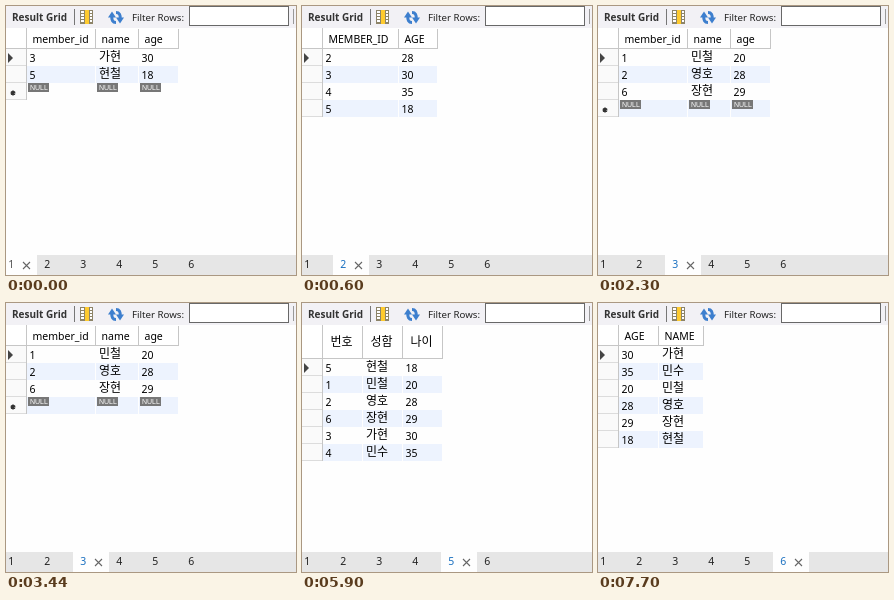
These frames come from a looping animation (290 px wide and 269 px high, 8 s). An HTML page:

```html
<!DOCTYPE html>
<html lang="ko">
<head>
<meta charset="utf-8">
<title>Result grid tabs</title>
<style>
  html, body { margin: 0; width: 100%; height: 100%; overflow: hidden; background: #fefefe; }
  svg { display: block; width: 290px; height: 269px; }
  rect { shape-rendering: crispEdges; }
  text { font: 10.5px "Noto Sans", "Noto Sans CJK KR", "Noto Sans CJK", sans-serif; fill: #000; white-space: pre; }
  text.ko { font: 12px "Noto Sans CJK KR", "Noto Sans CJK", sans-serif; }
  text.null { font: 7px "Liberation Sans", sans-serif; fill: #fff; }
  text.title { font-size: 10px; font-weight: 700; fill: #333; }
  text.label { font-size: 9.7px; fill: #222; }
</style>
</head>
<body>
<svg id="stage" viewBox="0 0 290 269"></svg>
<script>
const NS = 'http://www.w3.org/2000/svg';
const stage = document.getElementById('stage');

function add(parent, tag, attrs = {}, content) {
  const el = document.createElementNS(NS, tag);
  for (const key in attrs) el.setAttribute(key, attrs[key]);
  if (content !== undefined) el.textContent = content;
  parent.appendChild(el);
  return el;
}
const box = (p, x, y, width, height, fill) => add(p, 'rect', { x, y, width, height, fill });
const path = (p, d, attrs) => add(p, 'path', { d, fill: 'none', ...attrs });
const label = (p, x, y, str, cls = '') => add(p, 'text', { x, y, class: cls }, str);
const isHangul = str => /[가-힣]/.test(str);

const LINE = '#c6c6c6', STRIPE = '#edf3fe', ROW = 17;

// edges: left side of each column, then the right side of the last one
const tables = [
  { edges: [21, 90, 133, 173], heads: ['member_id', 'name', 'age'],
    rows: ['3 가현 30', '5 현철 18'], blank: true },
  { edges: [21, 97, 136], heads: ['MEMBER_ID', 'AGE'],
    rows: ['2 28', '3 30', '4 35', '5 18'] },
  { edges: [21, 90, 133, 173], heads: ['member_id', 'name', 'age'],
    rows: ['1 민철 20', '2 영호 28', '6 장현 29'], blank: true },
  { edges: [21, 66], heads: ['NAME'], rows: ['민수', '장현'] },
  { edges: [21, 61, 101, 141], heads: ['번호', '성함', '나이'], top: 56,
    rows: ['5 현철 18', '1 민철 20', '2 영호 28', '6 장현 29', '3 가현 30', '4 민수 35'] },
  { edges: [21, 61, 106], heads: ['AGE', 'NAME'],
    rows: ['30 가현', '35 민수', '20 민철', '28 영호', '29 장현', '18 현철'] }
];

// start time in ms, table shown, active tab
const steps = [
  [0, 0, 0], [500, 0, 1], [600, 1, 1], [2300, 2, 2],
  [4200, 3, 3], [5900, 4, 4], [7700, 5, 5]
];
const LOOP = 8000;

function drawToolbar() {
  box(stage, 0, 0, 290, 22, '#f2f1f5');
  label(stage, 6, 15, 'Result Grid', 'title');
  box(stage, 68, 3, 1, 16, '#777');

  box(stage, 74, 4, 13, 14, '#8d8468');
  box(stage, 79, 4, 4, 14, '#ffcb2e');
  for (let y = 5; y < 17; y += 3) {
    box(stage, 75, y, 3, 2, '#fff');
    box(stage, 84, y, 2, 2, '#fff');
  }

  const blue = '#3d7fce';
  const arc = { stroke: blue, 'stroke-width': 3 };
  path(stage, 'M110 16.5C106.5 16.5 105.5 14 105.8 10', arc);
  path(stage, 'M110 6.5C113.5 6.5 114.5 9 114.2 13', arc);
  path(stage, 'M102 11.5L106 5.5L110 11.5Z', { fill: blue });
  path(stage, 'M110 11.5L114 17.5L118 11.5Z', { fill: blue });

  label(stage, 126, 15, 'Filter Rows:', 'label');
  box(stage, 183, 0, 100, 20, '#686868');
  box(stage, 184, 1, 98, 18, '#fff');
  box(stage, 287, 3, 1, 15, '#999');
}

function drawTable({ edges, heads, rows, blank, top = 43 }) {
  const g = add(stage, 'g');
  const right = edges[edges.length - 1];
  const count = rows.length + (blank ? 1 : 0);

  box(g, 0, 22, right, top - 22, '#fff');
  box(g, 0, top - 1, right, 1, LINE);
  box(g, 20, 22, 1, top - 22 + count * ROW, LINE);
  heads.forEach((head, c) => {
    const ko = isHangul(head);
    box(g, edges[c + 1] - 1, 23, 1, top - 23, LINE);
    label(g, edges[c] + (ko ? 7.5 : 5.5), ko ? 43 : 37, head, ko ? 'ko' : '');
  });

  for (let r = 0; r < count; r++) {
    const y = top + r * ROW;
    box(g, 0, y, 20, ROW, '#fafafa');
    box(g, 0, y + ROW - 1, 20, 1, '#dcdcdc');
    heads.forEach((_, c) => {
      const x = edges[c];
      if (r % 2) box(g, x, y, edges[c + 1] - x - 1, ROW, STRIPE);
      if (r === rows.length) {
        box(g, x + 1, y, 21, 9, '#777');
        label(g, x + 3, y + 7, 'NULL', 'null');
        return;
      }
      const cell = rows[r].split(' ')[c];
      const ko = isHangul(cell);
      label(g, x + (ko ? 3 : 2.6), y + (ko ? 12 : 12.5), cell, ko ? 'ko' : '');
    });
  }

  path(g, `M2 ${top + 4}L7 ${top + 9}L2 ${top + 14}Z`, { fill: '#444' });
  if (blank) {
    const y = top + rows.length * ROW + 10;
    path(g, `M7 ${y - 2.6}v5.2M4.8 ${y - 1.3}l4.4 2.6M4.8 ${y + 1.3}l4.4 -2.6`,
      { stroke: '#333', 'stroke-width': 1.6 });
  }
  return g;
}

function drawTabs() {
  box(stage, 0, 249, 290, 20, '#e6e6e6');
  return tables.map((_, i) => {
    const x = 36 * i;
    const open = add(stage, 'g');
    box(open, x - 5, 249, 36, 20, '#fefefe');
    path(open, `M${x + 17} 256l7 7m0 -7l-7 7`, { stroke: '#666', 'stroke-width': 1.1 });
    const num = label(stage, x + 2.2, 262, i + 1);
    return { open, num };
  });
}

drawToolbar();
const grids = tables.map(drawTable);
const tabs = drawTabs();
const show = (el, on) => { el.style.display = on ? '' : 'none'; };

let current = -1;
function render() {
  const t = performance.now() % LOOP;
  let i = steps.length - 1;
  while (steps[i][0] > t) i--;
  if (i !== current) {
    current = i;
    const [, table, active] = steps[i];
    grids.forEach((g, n) => show(g, n === table));
    tabs.forEach(({ open, num }, n) => {
      show(open, n === active);
      num.style.fill = n !== active ? '#222' : n ? '#1a70c0' : '#555';
    });
  }
  requestAnimationFrame(render);
}
render();
</script>
</body>
</html>
```
